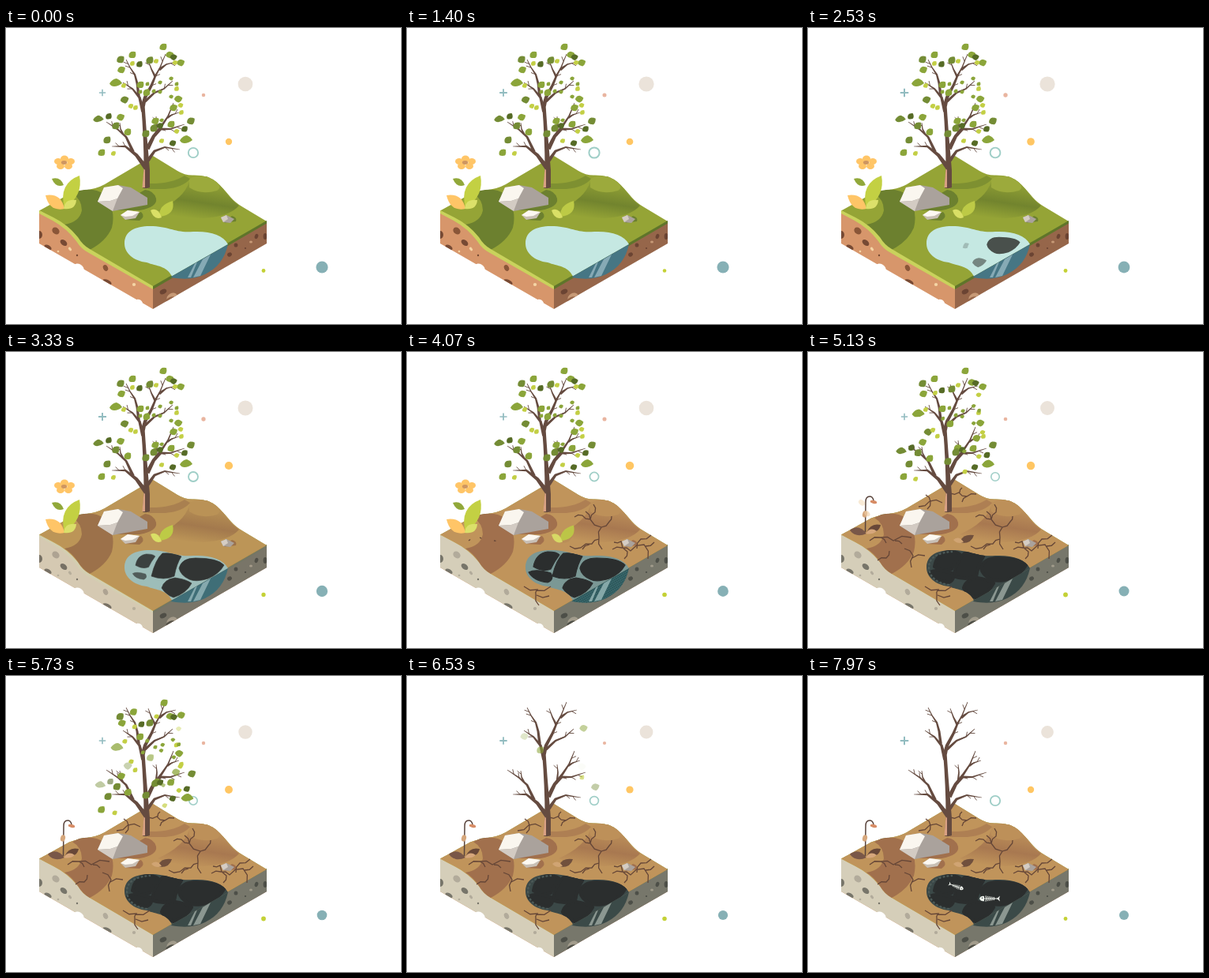
An HTML page that plays this animation: 500 px wide and 375 px high, repeating every 8000 ms.

```html
<!DOCTYPE html>
<html lang="en">
<head>
<meta charset="utf-8">
<title>Drying land</title>
<style>
html, body { margin: 0; width: 100%; height: 100%; overflow: hidden; background: #fff; }
svg { display: block; width: 100%; height: 100%; }
</style>
</head>
<body>
<svg id="stage" viewBox="0 0 500 375"></svg>
<script>
const LOOP = 8000;
const clamp = v => Math.max(0, Math.min(1, v));
const ramp = (t, a, b) => clamp((t - a) / (b - a));
const ease = (t, a, b) => { const p = ramp(t, a, b); return p * p * (3 - 2 * p); };
const rnd = i => { const v = Math.sin(i * 12.9898 + 4.1) * 43758.5453; return v - Math.floor(v); };
const path = (d, fill, extra = '') => `<path d="${d}" fill="${fill}" ${extra}/>`;
const oval = (x, y, rx, ry, fill, rot = 0) =>
  `<ellipse rx="${rx}" ry="${ry}" fill="${fill}" transform="translate(${x} ${y}) rotate(${rot})"/>`;
const group = (id, body, extra = '') => `<g id="${id}" ${extra}>${body}</g>`;
const parse = s => s.split(' ').map(p => p.split(',').map(Number));
const rgb = h => [1, 3, 5].map(i => parseInt(h.slice(i, i + 2), 16));
const mix = (a, b, p) => {
  const u = rgb(a), v = rgb(b);
  return `rgb(${u.map((c, i) => Math.round(c + (v[i] - c) * p))})`;
};

// Terrain
const TOP = 'M42 231.5L80 210.5Q92 206 106 204.5Q119 202.5 130 195L186 162L217 181Q226 186.5 236 186.5Q256 186 267 195.5Q275 203 284 214Q291 222 300 227L330 245L186 328L106 281Q97 276 91 266Q78 250 60 241Z';
const LEFT = 'M42 231.5L60 241Q78 250 91 266Q97 276 106 281L186 328V356L42 273Z';
const RIGHT = 'M186 328L330 245V273L186 356Z';
const POND = 'M150 273C150 257 164 251 182 251C208 251 213 260 237 258C258 257 275 262 281 274L210 314.5C203 301 191 302 178 297C161 295 150 285 150 273Z';
const SECTION = 'M210 314.5L281 274C277 292 268 304 252 312C240 318 226 319 209 316Z';

function terrain(id, c) {
  const stones = [
    [63, 257, 5, 4, 40, c.mid], [73, 272, 5, 3.3, 40, c.rock], [42, 262, 4, 5, 0, c.rock],
    [53, 278, 5, 3, 30, c.rock], [126, 304, 3, 4, -25, c.mid], [128, 322, 6, 3, 25, c.rock],
    [81, 280, 2.6, 1.7, 50, c.pale], [90, 288, 1.2, 1.2, 0, c.rock], [66, 283, 1.3, 1.2, 0, c.pale],
    [162, 325, 2.2, 2, 0, c.pale], [317, 264, 2.2, 3.2, 20, c.deep],
    [291, 275, 2.4, 2.6, 0, c.deep], [283, 287, 3, 2.5, -30, c.deep], [199, 334, 4.5, 3, -25, c.deep],
    [210, 341, 7, 5, -30, c.spot], [328, 264, 2.4, 4, 0, c.deep], [310, 271, 2, 1.5, 0, c.spot],
    [208, 344, 6, 3, -25, c.deep2], [303, 279, 1.2, 1, 0, c.deep]
  ].map(([x, y, rx, ry, r, f]) => oval(x, y, rx, ry, f, r)).join('');
  const edges = !c.edgeL ? '' :
    path('M42 231L60 240Q78 249 91 265Q97 275 106 280L186 327V331L105 285Q95 280 89 270Q77 254 59 244L42 235Z', c.edgeL) +
    path('M186 327L330 244V247.5L186 331Z', c.edgeR);
  return group(id,
    path(LEFT, c.left) + path(RIGHT, c.right) +
    `<g clip-path="url(#soil)">${stones}</g>` + path(TOP, c.ground) +
    path('M93 206Q112 202 123 210Q140 229 134 253Q127 270 106 281Q97 276 91 266Q84 255 74 249Q93 246 96 231Q96 217 84 210Z', c.dark) +
    `<linearGradient id="${id}Hill" x1=".7" y1="0" x2=".4" y2="1"><stop offset=".1" stop-color="${c.ground}"/><stop offset=".62" stop-color="${c.hill}"/><stop offset="1" stop-color="${c.ground}"/></linearGradient>` +
    path('M192 231Q226 216 232 194Q240 187 254 188Q266 193 275 204Q285 218 295 225Q283 239 250 241Q215 241 192 231Z', `url(#${id}Hill)`) +
    path('M232 191Q249 182 266 195Q274 202 267 206Q247 212 232 202Z', c.crest) +
    path('M178 197Q209 198 226 187L233 191Q224 202 202 204L180 204Z', c.dark, 'opacity=".55"') +
    path('M130 231L176 205Q187 206 190 216Q192 227 169 231Z', c.dark) +
    path('M150 243L171 233Q177 239 169 244Z', c.dark) +
    path('M276 247L286 238Q293 240 291 245Z', c.dark) + edges);
}
const lush = {
  left: '#d7966b', right: '#96664a', mid: '#8a5638', rock: '#774a34', pale: '#f5d5a5', deep: '#6b4433',
  deep2: '#96664a', spot: '#c79a77', ground: '#95a436', dark: '#6c802f', hill: '#72842e', crest: '#9caa3c',
  edgeL: '#c9d25c', edgeR: '#5f752a'
};
const arid = {
  left: '#d5ceb9', right: '#77776b', mid: '#b2ab9b', rock: '#77756a', pale: '#b2ab9b', deep: '#4d4f48',
  deep2: '#4d4f48', spot: '#a29c8c', ground: '#c0945b', dark: '#a1704d', hill: '#a87850', crest: '#bd9059'
};

const rocks =
  path('M116 220L124 202L142 199L158 202L179 215V224L135 232Z', '#aaa29c') +
  path('M116 220L124 202L142 199L148 203L141 216L132 219Z', '#faf6ef') +
  path('M116 220L132 219L141 216L135 232Z', '#d3cbc3') +
  path('M145 237L154 231L169 233L164 241L151 243Z', '#c8bfb5') +
  path('M145 237L154 231L169 233L160 238L151 239Z', '#fcf8f1') +
  path('M272 240L279 237L289 242L284 247L275 246Z', '#aaa29c') + path('M272 240L279 237L281 242L275 246Z', '#d5cdc4');

// Oil patches: outline, centre, start, duration
const patches = [
  ['M219 274Q222 261 240 261Q268 261 276 270Q270 281 256 287Q240 292 232 288Q221 283 219 274Z', 247, 276, 1900, 850],
  ['M197 299Q200 288 214 286Q228 288 235 293Q228 306 212 311Q203 308 197 299Z', 218, 296, 2150, 800],
  ['M184 284Q189 263 198 255Q212 254 222 259Q216 268 213 284Q200 290 184 284Z', 199, 277, 2350, 850],
  ['M160 272Q163 255 178 253Q190 253 193 257Q186 266 182 275Q172 279 160 272Z', 176, 265, 2650, 900],
  ['M154 279Q163 274 182 280Q187 288 178 292Q160 290 154 279Z', 169, 283, 2800, 900]
];
const pond =
  path(POND, '#c5e8e2', 'id="water"') + path(SECTION, '#467684', 'id="section"') +
  path(SECTION, 'url(#hatch)', 'id="hatching"') +
  path('M230 316L239 298.5L242 296.5L234 316ZM237 316L249 293L259 287L246 314Z', '#86aab5', 'id="shine"') +
  group('oil', patches.map(p => path(p[0], '#2b2e2e', 'stroke-linejoin="round"')).join(''), 'clip-path="url(#pondClip)"') +
  `<path id="pebbles" d="M178 295C163 293 153 284 153 273C153 260 165 254 182 253" fill="none" stroke="#4b5957" stroke-width="2.4" stroke-linecap="round" stroke-dasharray="1 4"/>`;

function fish(x, y, rot, size) {
  const ribs = [-5, -2.5, 0, 2.5, 5].map((v, i) => `M${v} ${-3.6 + i * .4}L${v + .8} 0L${v} ${3.6 - i * .4}`).join('');
  return `<g transform="translate(${x} ${y}) rotate(${rot}) scale(${size})"><path d="M-8 0H10${ribs}" fill="none" stroke="#eef2ec" stroke-width="1.1"/>` +
    path('M-13 0Q-11 -4 -7 -3V3Q-11 4 -13 0ZM9 0L13 -3.5L12 0L13 3.5Z', '#eef2ec') + oval(-9.5, -.8, .7, .7, '#2b2e2e') + '</g>';
}

// Cracks: start time, then polylines
const cracks = [
  [3400, '236,193 238,203 232,212 246,222 243,235 247,250', '212,209 222,207 232,212 226,202', '246,222 256,215 259,208', '243,237 234,243 220,248 206,246', '231,244 222,250'],
  [3500, '260,250 272,248 283,252 300,244 305,262', '262,241 271,240 279,253 275,262', '291,249 296,237 309,232', '302,246 313,241'],
  [3450, '148,297 165,301 163,308 167,321', '164,302 182,297', '164,308 180,309'],
  [4000, '78,239 92,235 108,239 131,235', '92,235 99,242', '110,239 119,243'],
  [4150, '122,249 133,258 131,273', '132,261 148,258', '88,264 99,261 103,252'],
  [4250, '140,196 154,189 170,191', '149,181 155,189 151,199'],
  [4350, '180,179 191,178 201,183 213,180', '201,183 195,190', '192,178 195,172']
];
// Breaks each segment once, a little off its middle
const jag = line => 'M' + parse(line).map(([x, y], i, all) => {
  if (!i) return `${x} ${y}`;
  const [px, py] = all[i - 1], k = rnd(x * 3 + y) > .5 ? .16 : -.16;
  return `${(px + x) / 2 + (py - y) * k} ${(py + y) / 2 + (x - px) * k}L${x} ${y}`;
}).join('L');
const crackArt = cracks.map(([start, ...lines]) =>
  `<path class="crack" data-start="${start}" d="${lines.map(jag).join('')}" pathLength="1" stroke-dasharray="1" fill="none" stroke="#654637" stroke-width="1.3"/>`).join('');

// Tree
const BARK = '#654b40';
function limb(width, line) {
  const pts = parse(line), n = pts.length - 1, a = [], b = [];
  let twigs = '';
  pts.forEach(([x, y], i) => {
    const p = pts[Math.max(0, i - 1)], q = pts[Math.min(n, i + 1)];
    const dir = Math.atan2(q[1] - p[1], q[0] - p[0]), w = width * (1 - i / n) / 2 + .35;
    const dx = Math.sin(dir) * w, dy = -Math.cos(dir) * w;
    a.push([x + dx, y + dy]);
    b.unshift([x - dx, y - dy]);
    if (i > 1) {
      const k = i === n ? .45 : 1, bx = p[0] + (x - p[0]) * k, by = p[1] + (y - p[1]) * k;
      const turn = dir + (rnd(x + y) > .5 ? .75 : -.75);
      twigs += `M${bx} ${by}l${Math.cos(turn) * 6.5} ${Math.sin(turn) * 6.5}`;
    }
  });
  return path('M' + a.concat(b).join('L') + 'Z', BARK) + `<path d="${twigs}" stroke="${BARK}" stroke-width=".9"/>`;
}
const tree =
  path('M173 202.5L174.5 178Q174.5 140 171 97H175.5Q177.5 128 179.5 150L182 180V202Q178 204 173 202.5Z', BARK) +
  path('M172.5 202L174.5 178L176 180V202Z', '#d9a183') +
  [
    [4.5, '173.3,99 176,88 184,73 189,61 195,50 202,33'], [5.5, '177,177 165,161 151,150 134,150'],
    [3.2, '161,157 152,138 142,129 127,119'], [4, '173.5,106 169,88 160,77 148,69'],
    [3, '168,86 166,70 163,59 157,50 152,40'], [2.2, '189,62 184,52 180,41'],
    [2.4, '194,53 203,46 215,43'], [2.8, '176,93 188,82 200,77 211,67'],
    [4.8, '179,153 187,137 196,128 208,128 226,122'], [3.4, '188,136 197,124 205,112 212,95'],
    [4, '179.5,168 188,156 201,151 220,154'], [2, '204,114 210,110 219,107'],
    [2, '190,133 191,122 190,112'], [1.6, '148,134 145,128 144,120']
  ].map(l => limb(...l)).join('');

const LEAF = 'M-5 2.5Q-5.5 -3 -1 -4.6Q3 -4.8 4.8 -3.6Q5.4 2 2.4 4.4Q-2 5 -5 2.5Z';
const LONG = 'M-8 1.5Q-4 -5 1 -5Q6 -3 8 1Q3 5 -2 5Q-6 5 -8 1.5Z';
const foliage = [
  ['#8ba53a', .92, '199,24 160,34 207,34 221,44 146,53 170,72 178,82 218,90 212,101 145,113 154,132 121,158 189,118 209,122'],
  ['#748c35', .95, '145,40 182,41 150,91 128,142 139,124 234,118 187,127 177,134'],
  ['#566b26', .8, '169,46 130,112 226,128 212,37 195,124 211,146'],
  ['#c3cf45', .62, '160,45 190,42 149,73 158,99 164,101 216,77 221,98 222,107 136,159 197,143 216,131 214,44'],
  ['#8ba53a', .52, '195,69 209,64 216,71 170,81 187,80 195,81 209,87 179,71 197,117 154,130'],
  ['#8ba53a', 1, '139,69 228,141', LONG],
  ['#748c35', .85, '117,115', LONG]
];
const leaves = foliage.flatMap(([fill, size, spots, shape = LEAF]) =>
  parse(spots).map(([x, y]) => ({ x, y, fill, size, shape })));
leaves.forEach((l, i) => {
  l.rot = l.shape === LONG ? 0 : rnd(i) * 50 - 25;
  l.start = 4620 + rnd(i + 90) * 880;
  l.drift = rnd(i + 300) * 7 - 1.5;
});
const leafArt = leaves.map(l => path(l.shape, l.fill, 'class="leaf"')).join('');

// Small plants
const petals = [[66, 169], [74, 165.5], [82, 169], [79, 175], [69, 175]];
const flower = petals.map(([x, y]) => oval(x, y, 5, 4, '#ffc567')).join('') + oval(73.5, 170.5, 3.6, 2.4, '#cf9660') +
  path('M58 191Q69 188 73 199Q63 203 58 191Z', '#91a83a') +
  path('M74 228Q66 197 93 187Q98 213 74 228Z', '#c3d043') +
  path('M50 212Q70 209 74 229Q55 233 50 212Z', '#ffc567') +
  path('M73 229Q74 216 89 218Q88 231 73 229Z', '#dbe06a');
const wilted =
  '<path d="M72.5 228L73 190Q73 183 78 183Q82 183 83 188" fill="none" stroke="#59443c" stroke-width="1.5"/>' +
  oval(83, 190, 4.3, 2, '#d78c65', 12) + oval(72, 205.5, 3, 4.2, '#d6a77c', 15) +
  path('M53 226Q64 217 74 230Q61 236 53 226Z', '#795748') + path('M74 229Q79 216 92 219Q90 230 74 229Z', '#684838') +
  path('M73 230Q79 221 87 227Q81 232 73 230Z', '#d6a77c');
const sprout = path('M194 239Q193 224 211 219Q215 237 194 239Z', '#bdca46') + path('M183 231Q192 226 197 240Q187 244 183 231Z', '#d9df66');
const husk = path('M193 239Q197 230 210 232Q207 243 194 242Z', '#70503d') + path('M184 238Q191 232 197 241Q189 244 184 238Z', '#d0a473');

// Floating marks: x, y, time of largest size, period, art
const disc = (r, fill) => `<circle r="${r}" fill="${fill}"/>`;
const marks = [
  [303, 71, 2000, 16000, disc(8.6, '#ebe3da')],
  [282, 144, 4300, 8000, disc(4.7, '#ffc663')],
  [250, 85, 2800, 8000, disc(2.4, '#e9b5a0')],
  [326, 307.5, 5200, 8000, disc(2.6, '#c4d136')],
  [400, 303, 800, 14000, disc(6.8, '#86b0b5')],
  [237, 158, 1500, 8000, '<circle r="5.9" fill="none" stroke="#9fcec7" stroke-width="1.8"/>'],
  [122, 82, 2500, 5400, '<path d="M-4.7 0H4.7M0 -4.7V4.7" stroke="#92bcc0" stroke-width="1.8"/>']
];

const stage = document.getElementById('stage');
stage.innerHTML =
  `<defs><clipPath id="soil"><path d="${LEFT}${RIGHT}"/></clipPath><clipPath id="pondClip"><path d="${POND}"/></clipPath>
  <pattern id="hatch" width="2.5" height="2.5" patternUnits="userSpaceOnUse" patternTransform="rotate(-30)"><path d="M0 1H1.8" stroke="#1f4346" stroke-width=".9"/></pattern></defs>` +
  group('marks', marks.map(m => `<g>${m[4]}</g>`).join('')) + terrain('lush', lush) + terrain('arid', arid) +
  oval(92, 304, 7, 5, '#fff', 30) + oval(168, 348, 5, 4, '#fff', 30) +
  pond + group('bones', fish(187.5, 266.5, 200, .76) + fish(230, 282, 0, 1)) + rocks + crackArt +
  group('husk', husk) + group('sprout', sprout) + group('wilted', wilted) + group('flower', flower) +
  group('petals', oval(0, 0, 4.5, 3.2, '#f5dfc0', 40) + oval(7, 14, 4, 3, '#efcfa8', 50)) +
  group('tree', tree) + group('leaves', leafArt);

const $ = id => document.getElementById(id);
const set = (el, attrs) => { for (const k in attrs) el.setAttribute(k, attrs[k]); };
const leafEls = [...stage.querySelectorAll('.leaf')];
const crackEls = [...stage.querySelectorAll('.crack')];
const patchEls = [...$('oil').children];
const markEls = [...$('marks').children];

function draw(t) {
  markEls.forEach((el, i) => {
    const [x, y, peak, period] = marks[i];
    const s = 1 + .12 * Math.cos((t - peak) / period * Math.PI * 2);
    set(el, { transform: `translate(${x} ${y}) scale(${s})` });
  });

  const dry = ease(t, 2570, 3500), murk = ease(t, 2700, 3900), tar = ease(t, 4100, 4900);
  set($('arid'), { opacity: dry });
  const tint = (id, a, b, c) => set($(id), { fill: tar ? mix(b, c, tar) : mix(a, b, murk) });
  tint('water', '#c5e8e2', '#7b9895', '#3b4847');
  tint('section', '#467684', '#39686c', '#3b4a48');
  tint('shine', '#86aab5', '#85a8a8', '#8b9791');
  set($('hatching'), { opacity: ease(t, 3300, 3900) * (1 - tar) });
  set($('pebbles'), { opacity: ease(t, 4200, 4900) });
  patchEls.forEach((el, i) => {
    const [, x, y, start, span] = patches[i], p = ramp(t, start, start + span);
    const fill = mix('#3a3e3a', '#2b2e2e', murk);
    set(el, {
      transform: `translate(${x} ${y}) scale(${p}) translate(${-x} ${-y})`,
      opacity: Math.min(1, p * 1.2), fill, stroke: fill, 'stroke-width': murk * 1.2 + tar * 3
    });
  });
  set($('bones'), { opacity: ease(t, 6750, 7450) });

  crackEls.forEach(el => {
    const start = +el.dataset.start, p = ease(t, start, start + 650);
    set(el, { 'stroke-dashoffset': 1 - p, opacity: p ? 1 : 0 });
  });

  const droop = ease(t, 4250, 4950), curl = ease(t, 3950, 4650);
  set($('flower'), { opacity: 1 - droop, transform: `translate(0 ${droop * 12}) rotate(${droop * 5} 74 229)` });
  set($('wilted'), { opacity: droop });
  set($('sprout'), { opacity: 1 - curl, transform: `translate(0 ${curl * 6})` });
  set($('husk'), { opacity: curl });
  const drop = ramp(t, 4850, 5650);
  set($('petals'), { opacity: ramp(t, 4600, 4900) * (1 - drop), transform: `translate(68 ${188 + drop * 8})` });

  leafEls.forEach((el, i) => {
    const l = leaves[i], p = ramp(t, l.start, l.start + 1200);
    set(el, {
      transform: `translate(${l.x + l.drift * p} ${l.y + 25 * p}) rotate(${l.rot + l.drift * p * 3}) scale(${l.size})`,
      opacity: 1 - ramp(p, .78, 1)
    });
  });
}

function tick() {
  draw(performance.now() % LOOP);
  requestAnimationFrame(tick);
}
tick();
</script>
</body>
</html>
```
